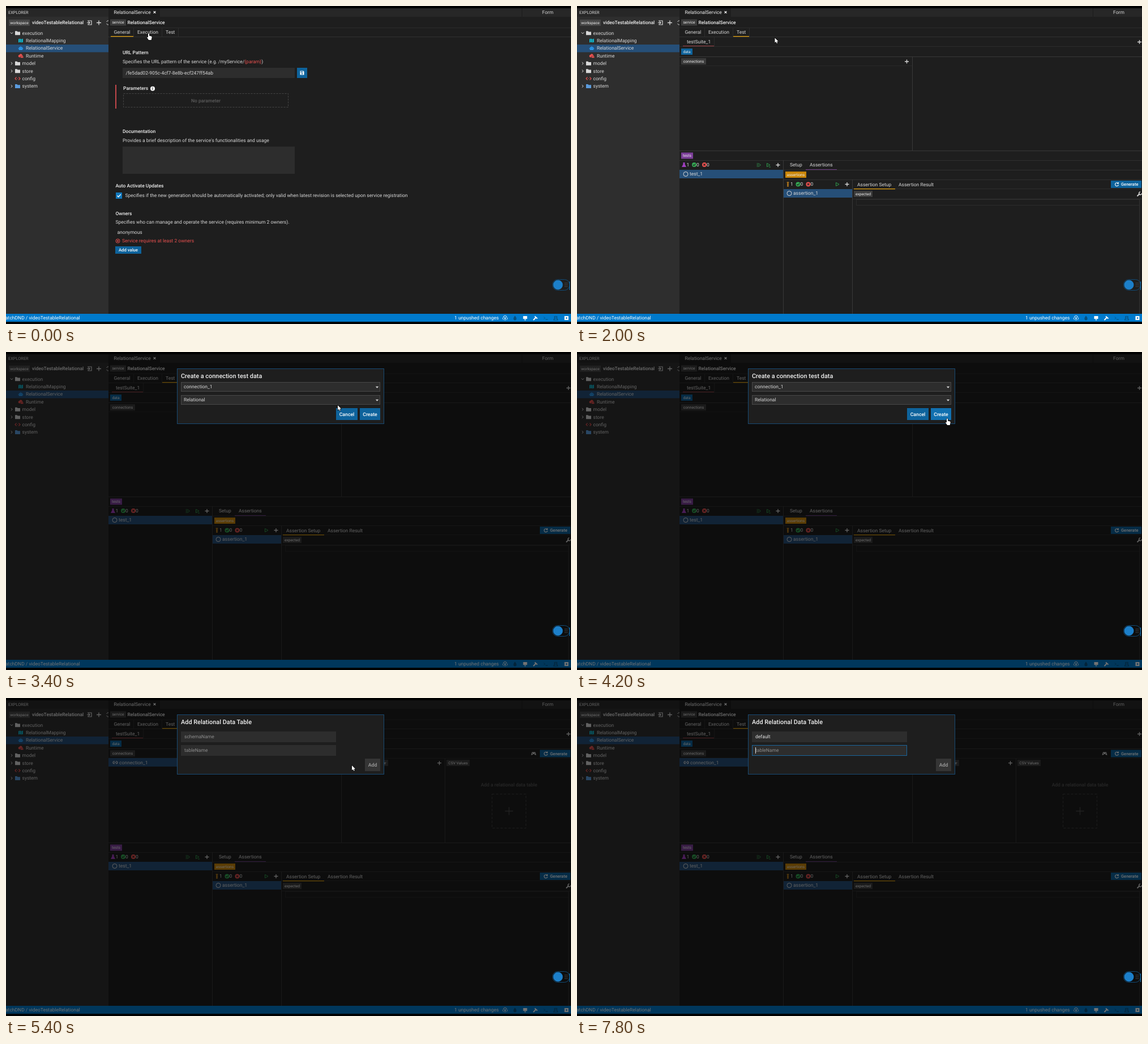
Write an HTML page with a canvas that moves like this. It is 998 by 561 pixels and loops after 8000 ms.

```html
<!DOCTYPE html>
<html lang="en">
<head>
<meta charset="utf-8">
<title>Service test walkthrough</title>
<style>
  html, body { margin: 0; width: 100%; height: 100%; overflow: hidden; background: #000; }
  canvas { display: block; }
</style>
</head>
<body>
<canvas id="stage" width="998" height="561"></canvas>
<script>
const ctx = document.getElementById('stage').getContext('2d');
ctx.textRendering = 'geometricPrecision';

const LOOP = 8000, STEP = 200;
const SANS = 'Roboto, sans-serif', MONO = '"Noto Sans Mono", monospace';
const ink = '#d8d8d8', white = '#fff', rule = '#383838', field = '#2d2d2d', grey = '#3c3c3c';
const blue = '#0e639c', select = '#264f78', amber = '#e0a010', red = '#e8504f', green = '#34a853', cyan = '#12b5cb';

// Drawing helpers
function box(x, y, w, h, color) {
  ctx.fillStyle = color;
  ctx.fillRect(x, y, w, h);
}
function frame(x, y, w, h, color, dash = []) {
  ctx.strokeStyle = color;
  ctx.lineWidth = 1;
  ctx.setLineDash(dash);
  ctx.strokeRect(x + .5, y + .5, w - 1, h - 1);
  ctx.setLineDash([]);
}
const hline = (x1, x2, y, color = rule, h = 1) => box(x1, y, x2 - x1, h, color);
const vline = (x, y1, y2, color = rule) => box(x, y1, 1, y2 - y1, color);

function write(s, x, y, color = ink, size = 8.5, weight = 400, align = 'left', family = SANS) {
  ctx.font = `${weight} ${size}px ${family}`;
  ctx.textAlign = align;
  ctx.fillStyle = color;
  ctx.fillText(s, x, y + size * .35);
  return x + ctx.measureText(s).width;
}
const bold = (s, x, y, size = 8.5) => write(s, x, y, '#f0f0f0', size, 500);

function fill(x, y, path, color) {
  ctx.save();
  ctx.translate(x, y);
  ctx.fillStyle = color;
  ctx.fill(new Path2D(path), 'evenodd');
  ctx.restore();
}
function stroke(x, y, path, color, width = 1) {
  ctx.save();
  ctx.translate(x, y);
  ctx.strokeStyle = color;
  ctx.lineWidth = width;
  ctx.stroke(new Path2D(path));
  ctx.restore();
}
function disc(x, y, r, color) {
  ctx.fillStyle = color;
  ctx.beginPath();
  ctx.arc(x, y, r, 0, 7);
  ctx.fill();
}
function ring(x, y, r, color, width = 1) {
  ctx.strokeStyle = color;
  ctx.lineWidth = width;
  ctx.beginPath();
  ctx.arc(x, y, r, 0, 7);
  ctx.stroke();
}

// Icons and small controls
const plus = (x, y, r = 3.5, color = ink, w = 1.3) => stroke(x, y, `M${-r} 0H${r}M0 ${-r}V${r}`, color, w);
const cross = (x, y, r, color) => stroke(x, y, `M${-r} ${-r}L${r} ${r}M${r} ${-r}L${-r} ${r}`, color, 1.2);
const caret = (x, y) => fill(x, y, 'M-2.7-1.2H2.7L0 1.8z', ink);
const folder = (x, y, color) => fill(x, y, 'M-4.5-3.5H-1L0-2.3H4.5V3.5H-4.5z', color);
const mapIcon = (x, y) => {
  fill(x, y, 'M-4-2.5L-1.7-3.5V2.7L-4 3.5zM-1.2-3.5L1.2-2.5V3.5L-1.2 2.7zM1.7-2.5L4-3.5V2.7L1.7 3.5z', cyan);
};
const runtimeIcon = (x, y) => {
  fill(x, y, 'M-4 1.5C-5-1-3-2-2-2C-1-4 2-4 2.5-1.5C4-1 4 0 3.5.5H-.5V2.5H-3z', red);
  box(x, y + 1, 4.5, 2.3, red);
};
const robot = (x, y) => {
  fill(x, y, 'M-3-2H-.5V-3.8H.5V-2H3V3H-3zM-4.2-.5H-3.4V2H-4.2zM3.4-.5H4.2V2H3.4zM-2-.6V.6H-.8V-.6zM.8-.6V.6H2V-.6z', '#2a9df4');
};
const gear = (x, y, color, hole) => {
  for (let i = 0; i < 4; i++) {
    const a = i * Math.PI / 4, c = Math.cos(a) * 4.2, s = Math.sin(a) * 4.2;
    stroke(x, y, `M${-c} ${-s}L${c} ${s}`, color, 1.7);
  }
  disc(x, y, 3.2, color);
  disc(x, y, 1.3, hole);
};
const playOutline = (x, y) => stroke(x, y, 'M-2.5-3L3 0L-2.5 3z', '#2f9a4c');
const wrench = (x, y) => {
  stroke(x, y, 'M-3.5 3.5L1 -1', ink, 1.8);
  stroke(x, y, 'M2-4A2.5 2.5 0 1 0 4.5-1.5', ink, 1.3);
};

function tag(s, x, y, w, color = grey) {
  box(x, y - 5.5, w, 11, color);
  write(s, x + w / 2, y, '#f0f0f0', 6.7, 400, 'center');
}
function button(s, x, y, w, h, color, size, textColor = white) {
  box(x, y, w, h, color);
  write(s, x + w / 2, y + h / 2, textColor, size, 500, 'center');
}
function generate(y) {
  box(943, y - 6.5, 54, 13, blue);
  stroke(953.5, y, 'M2.3-1.8A3 3 0 1 0 3 .8M2.8-3.6V-1.2H.4', white, 1.1);
  write('Generate', 961, y, white, 7.5, 500);
}
function counts(x, y, color, flask) {
  fill(x, y, flask ? 'M-1.5-4H1.5V-1L4 4H-4L-1.5-1z' : 'M-1.8-4H1.8V-2.5H-1.8zM-1.3-1.8H1.3V1H-1.3zM-1.3 1.8H1.3V4H-1.3z', color);
  write('1', x + 4.5, y);
  disc(x + 18, y, 4, green);
  stroke(x + 18, y, 'M-2 0L-.5 1.6L2.2-1.5', '#1e1e1e', 1.1);
  write('0', x + 22, y);
  disc(x + 36, y, 4, red);
  cross(x + 36, y, 1.6, '#1e1e1e');
  write('0', x + 40, y);
}
function dropdown(s, x, y, w, h, textX) {
  box(x, y, w, h, field);
  frame(x, y, w, h, '#484848');
  write(s, textX, y + h / 2);
  caret(x + w - 5.5, y + h / 2 + .5);
}

// Screen parts
function sidebar() {
  box(0, 4, 181, 539, '#2e2e2e');
  box(0, 4, 181, 15, '#272727');
  write('EXPLORER', 4, 11, ink, 7.4);
  tag('workspace', 5, 29.5, 37, '#474747');
  bold('videoTestableRelational', 46, 29.5);
  stroke(147, 29.5, 'M-2-2V-3.5H4V3.5H-2V2M-4 0H1M-1-2L1 0L-1 2', ink, 1.2);
  plus(164, 29.5, 4);
  stroke(180, 29.5, 'M-2.5-1.5L0-4L2-2M-2.5 1.5L0 4L2 2', ink);

  box(0, 68, 181, 13.5, select);
  const rows = [['execution', 1, ink], ['RelationalMapping', 0], ['RelationalService', 0], ['Runtime', 0],
    ['model', 1, ink], ['store', 1, ink], ['config', 0], ['system', 1, '#5b9bdc']];
  rows.forEach(([name, isFolder, color], i) => {
    const y = 47.7 + i * 13.4, nested = i > 0 && i < 4;
    if (isFolder) {
      stroke(10, y, i ? 'M-1.2-2.2L1.2 0L-1.2 2.2' : 'M-2.2-1.2L0 1.2L2.2-1.2', ink);
      folder(20.5, y, color);
    }
    write(name, nested ? 35 : 28.5, y);
  });
  mapIcon(26, 61);
  robot(26, 74.5);
  runtimeIcon(26, 88);
  stroke(20.5, 128, 'M-2-2.5L-4.5 0L-2 2.5M2-2.5L4.5 0L2 2.5M-.7 0H.7', red, 1.1);
}

function header(tab) {
  box(181, 4, 817, 539, '#1e1e1e');
  box(181, 4, 817, 15, '#272727');
  box(181, 4, 91, 15, '#1e1e1e');
  write('RelationalService', 190.5, 11, '#f0f0f0');
  cross(262.5, 11, 1.9, white);
  vline(911, 4, 19, '#1b1b1b');
  write('Form', 957, 11, ink, 8.5, 400, 'center');
  tag('service', 184, 29, 28);
  bold('RelationalService', 214.5, 29);
  hline(181, 998, 38, '#2a2a2a');
  hline(181, 998, 54, '#303030');
  [['General', 190.5, 185, 225], ['Execution', 232, 226, 275], ['Test', 282, 276, 304]].forEach(([name, x, from, to], i) => {
    write(name, x, 46);
    vline(to, 38, 54, '#2c2c2c');
    if (i === tab) hline(from, to, 53, amber, 1.3);
  });
}

function generalTab() {
  bold('URL Pattern', 206, 82);
  let x = write('Specifies the URL pattern of the service (e.g. /myService/', 206, 98);
  x = write('{param}', x, 98, red);
  write(')', x, 98);
  box(206, 109, 304, 18, field);
  write('/fe5dad02-905c-4cf7-8e8b-ecf247ff54ab', 211.5, 118);
  box(514, 109, 18, 18, blue);
  fill(523, 118, 'M-3.5-3.5H2.3L3.5-2.3V3.5H-3.5zM-2.3-2.4V-.8H1.4V-2.4zM-1.2 1.5A1.2 1.2 0 1 0 1.2 1.5A1.2 1.2 0 1 0-1.2 1.5z', white);
  box(193, 139, 2, 42, '#c2474b');
  bold('Parameters', 207, 145.5);
  disc(259, 145.7, 4, white);
  write('i', 259, 145.7, '#1e1e1e', 7, 700, 'center');
  frame(207, 154, 292, 25, '#444', [3, 2]);
  write('No parameter', 353, 167, '#5c5c5c', 8.5, 500, 'center');
  bold('Documentation', 206, 221.5);
  write('Provides a brief description of the service\'s functionalities and usage', 206, 237);
  box(206, 248, 304, 48, field);
  bold('Auto Activate Updates', 193.5, 317.5);
  box(194, 329, 11, 11, '#1177bb');
  stroke(199.5, 334.5, 'M-3 0L-1 2.3L3.2-2.3', white, 1.3);
  write('Specifies if the new generation should be automatically activated; only valid when latest revision is selected upon service registration', 210.5, 334.5);
  bold('Owners', 193.5, 366);
  write('Specifies who can manage and operate the service (requires minimum 2 owners).', 193.5, 381);
  write('anonymous', 196.5, 399);
  ring(197.5, 414.5, 3.5, red);
  cross(197.5, 414.5, 1.3, red);
  write('Service requires at least 2 owners', 205, 414.5, red);
  button('Add value', 193, 424, 46, 13, blue, 7.7);
}

const palette = { p: '#d4d4d4', m: '#8c8c8c', c: '#4ec9b0', f: '#dcdcaa', s: '#ce9178' };
const code = [
  [0, 'p|', 'mmodel::', 'cPerson', 'p.', 'fall', 'p()->', 'fproject', 'p('],
  [2, 'p['],
  [4, 'px|$x.', 'ffirstName', 'p,'],
  [4, 'px|$x.', 'flastName'],
  [2, 'p],'],
  [2, 'p['],
  [4, "s'First Name'", 'p,'],
  [4, "s'Last Name'"],
  [2, 'p]'],
  [0, 'p)']
];
function executionTab() {
  tag('query', 184, 63, 23, blue);
  stroke(911, 63, 'M-3 3L2.5-2.5', ink, 1.8);
  disc(928.5, 63, 4.2, ink);
  stroke(928.5, 63, 'M0-2.5V2M-2 0L0 2L2 0', '#1e1e1e', 1.1);
  box(941, 56, 57, 14, blue);
  vline(991, 56, 70, '#0a4a76');
  fill(948, 63, 'M-3-3.8L3.5 0L-3 3.8z', white);
  write('Execute', 956, 63, white, 7.6, 500);
  caret(995, 63.5);

  hline(181, 998, 71, '#2a2a2a');
  hline(223, 935, 72, '#2b2b2b');
  hline(223, 935, 84, '#2b2b2b');
  vline(223, 85, 178, '#4a4a4a');
  vline(233, 97, 120, '#343434');
  vline(233, 143, 166, '#343434');
  code.forEach(([indent, ...parts], i) => {
    const y = 79 + i * 11.6;
    write(i + 1, 206.5, y, i ? '#858585' : '#c6c6c6', 8.5, 400, 'right', MONO);
    let x = 223 + indent * 5.1;
    for (const part of parts) x = write(part.slice(1), x, y, palette[part[0]], 8.5, 400, 'left', MONO);
  });
  for (let i = 0; i < 5; i++) hline(936 + i % 2, i ? 941 : 943, 75 + i * 1.4, '#777', .6);
  vline(992, 72, 300, '#2b2b2b');
  box(993, 72, 5, 155, '#424242');

  hline(181, 998, 300);
  tag('context', 184, 308, 29, '#b5215c');
  hline(181, 998, 316, '#292929');
  for (const y of [326, 349]) {
    box(190, y, 17, 16, field);
    box(976, y, 17, 16, blue);
  }
  dropdown('execution::RelationalMapping', 210, 326, 763, 16, 215);
  dropdown('(custom)', 210, 349, 763, 16, 226);
  mapIcon(198.5, 334);
  runtimeIcon(198.5, 357);
  gear(219, 357, '#1c84cc', field);
  stroke(984.5, 334, 'M-4 0H3.5M1.5-2L3.5 0L1.5 2', white, 1.2);
  gear(984.5, 357, white, blue);
}

function connectionData() {
  box(181, 106, 411, 15, select);
  stroke(193, 113.7, 'M-1-2H-2A2 2 0 0 0-2 2H-1M1-2H2A2 2 0 0 1 2 2H1M-2 0H2', ink, 1.1);
  write('connection_1', 200, 113.7);
  tag('embedded data', 595, 98, 53);
  fill(932, 98, 'M-3-2.5H3L4.5 2.5H2.5L1.5 1H-1.5L-2.5 2.5H-4.5zM-2.7-1V.3H-1.2V-1zM1.2-1V.3H2.7V-1z', ink);
  generate(98);
  hline(592, 998, 106, '#2c2c2c');
  tag('Relational Table Explorer', 595, 114.5, 80);
  plus(765.5, 114.7);
  vline(775, 106, 255);
  tag('CSV Values', 778, 114.5, 41);
  write('Add a relational data table', 888.5, 153, '#565656', 8.5, 500, 'center');
  frame(858, 169, 61, 61, '#414141', [4, 3]);
  plus(888.5, 199.5, 7, '#4a4a4a', 1.3);
}

function testTab(connected) {
  write('testSuite_1', 194, 63.5);
  hline(181, 998, 71, '#2c2c2c');
  hline(187, 242, 70, '#9d4045');
  vline(242, 55, 71, '#2c2c2c');
  plus(993.5, 63.5);
  tag('data', 184, 80.5, 20, blue);
  hline(181, 998, 89);
  tag('connections', 184, 97.7, 44);
  plus(582.5, 98);
  hline(181, 592, 105, '#282828');
  vline(592, 89, 255);
  if (connected) connectionData();

  hline(181, 998, 255);
  tag('tests', 184, 264, 21, '#7c3f99');
  hline(181, 998, 272, '#303030');
  counts(189, 280, '#a03fc0', true);
  stroke(321, 280.5, 'M-3.5-2.5H0L3.5 0L0 2.5H-3.5M-3.5 0H0', '#2f8547');
  playOutline(338, 280.5);
  stroke(338, 280.5, 'M1 3.5H4', '#2f9a4c');
  plus(355, 280.5);
  box(181, 289, 183, 15, select);
  ring(192, 296.5, 4, ink);
  write('test_1', 199, 296.5);
  vline(364, 272, 543);

  write('Setup', 376, 280);
  write('Assertions', 411, 280);
  hline(365, 998, 289, '#303030');
  hline(404, 459, 288, '#704087');
  tag('assertions', 368, 297.5, 37, '#c98508');
  hline(365, 998, 306, '#303030');
  counts(372.5, 314.5, '#d08a1c', false);
  playOutline(460, 314.5);
  plus(477, 314.5);
  box(365, 323, 121, 15, select);
  ring(375, 330.5, 4, ink);
  write('assertion_1', 382, 330.5);
  vline(486, 306, 543);

  write('Assertion Setup', 495, 315);
  write('Assertion Result', 568, 315);
  hline(487, 998, 322, '#2c2c2c');
  hline(489, 562, 322, amber, 1.3);
  generate(314.5);
  tag('expected', 489, 331.5, 33);
  wrench(993, 332);
  hline(487, 998, 340, '#303030');
  frame(493, 341, 501, 11, '#2b2b2b');
  vline(993, 341, 543, '#333');
}

function statusBar() {
  box(0, 543, 998, 14, '#007acc');
  write('atchDND / videoTestableRelational', -1, 550.5, white);
  write('1 unpushed changes', 792, 550.5, white);
  stroke(881.5, 550.5, 'M-2 2.5H-3A2 2 0 0 1-3-1A3 3 0 0 1 3-1A2 2 0 0 1 3 2.5H2M0 4V-1M-1.5 .5L0-1L1.5 .5', white);
  const dim = '#07507f';
  fill(899, 550.5, 'M0-4C4 0 3 4 0 4C-3 4-4 0 0-4z', dim);
  fill(917, 550.5, 'M-3.5-3.5H3.5V1.5H-3.5zM-2 2.2H2L0 4.2z', white);
  stroke(935, 550.5, 'M-3.5 3.5L1-1M-1-3L3.5 1', white, 1.8);
  stroke(953, 550.5, 'M-3-2L-1 0L-3 2M0 2.5H4', dim);
  stroke(971, 550.5, 'M-2-3H2V0H-2zM-3.5 3.5L-2 0H2L3.5 3.5z', dim, 1.2);
  fill(990, 550.5, 'M-3.5-3.5H3.5V3.5H-3.5zM-1-2V2L2 0z', white);
}

function modal(title, height) {
  box(0, 0, 998, 561, 'rgba(0,0,0,.55)');
  box(302, 29, 366, height, '#1e1e1e');
  frame(302, 29, 366, height, '#184a73');
  bold(title, 309, 42, 10.9);
}
function connectionModal(hover) {
  modal('Create a connection test data', 98);
  dropdown('connection_1', 309, 53, 352, 17, 314);
  dropdown('Relational', 309, 76, 352, 17, 314);
  button('Cancel', 583, 99, 38, 21, blue, 8.7);
  button('Create', 625, 99, 36, 21, hover ? '#1170b0' : blue, 8.7);
}
function tableModal(typed, focus) {
  modal('Add Relational Data Table', 106);
  [['schemaName', typed], ['tableName', '']].forEach(([hint, value], i) => {
    const y = 59 + i * 24;
    box(309, y, 274, 19, field);
    const end = write(value || hint, 315, y + 9.5, value ? '#e4e4e4' : '#8d8d8d');
    if (focus === i) {
      frame(309, y, 274, 19, '#1a659c');
      vline(value ? end : 315, y + 4, y + 15, '#ddd');
    }
  });
  button('Add', 634, 107, 27, 22, '#353535', 8.7, '#a0a0a0');
}

function floatingToggle() {
  ctx.strokeStyle = '#114a75';
  ctx.lineWidth = 1;
  ctx.beginPath();
  ctx.roundRect(965.5, 482.5, 30, 19, 9);
  ctx.stroke();
  vline(995, 486, 501, '#1177bb');
  disc(975, 492, 8.5, '#1c7fc9');
  for (let i = 0; i < 6; i++) box(987 + i % 2 * 3, 488 + (i >> 1) * 3, 1.5, 1.5, '#4c4c4c');
}

// Pointer: time, x, y of its tip
const route = [[0, 251, 48], [400, 251, 48], [1000, 291, 47], [1600, 291, 47], [3000, 586, 94], [3600, 586, 94],
  [4000, 653, 117], [4200, 653, 117], [4400, 695, 111], [4800, 763, 112], [5200, 763, 112], [5400, 611, 119], [6000, 400, 66]];
const HAND = 'M0 1Q1-.5 2 1V4.5L6 5.5Q7 6 6.6 8L5.6 12H1L-2 7.5Q-1.5 6 0 7.5z';
const ARROW = 'M0 0V8.5L2 6.8L3.4 9.7L4.8 9L3.5 6.2H6.2z';
function pointer(t) {
  if (t > 6000) return;
  const i = Math.max(1, route.findIndex(key => key[0] >= t));
  const [t0, x0, y0] = route[i - 1], [t1, x1, y1] = route[i];
  const u = (t - t0) / (t1 - t0), k = u * u * (3 - 2 * u);
  const x = x0 + (x1 - x0) * k, y = y0 + (y1 - y0) * k;
  const overButton = t <= 1600 || (t >= 4000 && t <= 4200);
  const path = overButton ? HAND : ARROW;
  stroke(x, y, path, '#000', 1.2);
  fill(x, y, path, white);
}

function draw(t) {
  const tab = t < 400 ? 0 : t < 1400 ? 1 : 2;
  box(0, 0, 998, 561, '#000');
  sidebar();
  header(tab);
  [generalTab, executionTab, () => testTab(t >= 4400)][tab]();
  statusBar();
  if (t >= 3400 && t < 4400) connectionModal(t >= 4000);
  if (t >= 5200) {
    const letters = Math.max(0, Math.floor((t - 6200) / 140));
    tableModal('default'.slice(0, letters), t >= 7400 ? 1 : t >= 6000 ? 0 : -1);
  }
  floatingToggle();
  pointer(t);
}

function tick(now) {
  draw(Math.floor(now % LOOP / STEP) * STEP);
  requestAnimationFrame(tick);
}
requestAnimationFrame(tick);
</script>
</body>
</html>
```
